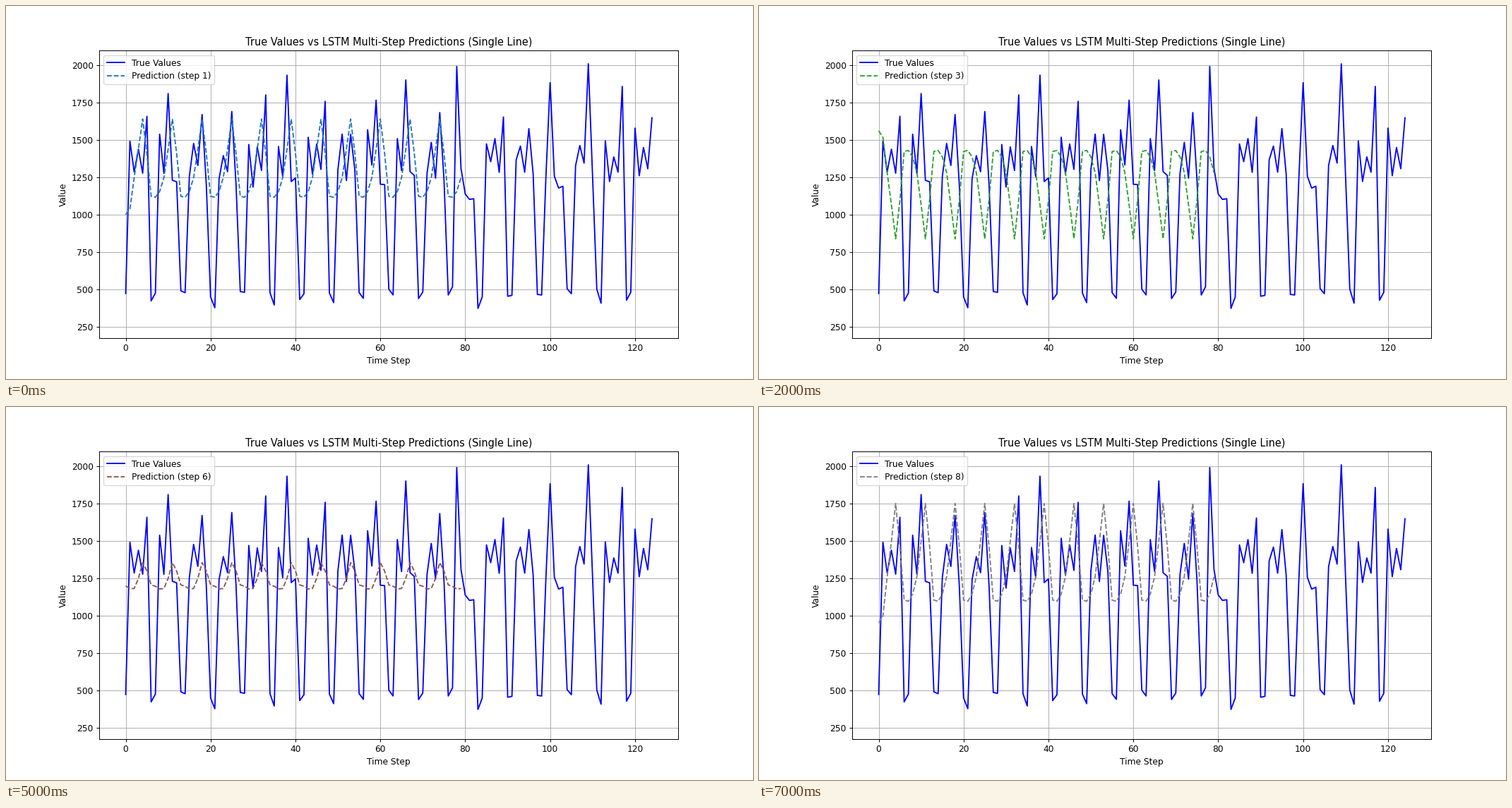
These frames come from a looping animation (1058x529 px, 8000 ms). A matplotlib script:

```python
import numpy as np
import matplotlib.pyplot as plt
from matplotlib.animation import FuncAnimation

DPI = 1058 / 12
DAYS, PREDICTED_DAYS, STEPS = 125, 80, 8
CENTRE = 1300

plt.rcParams["font.family"] = "DejaVu Sans"
rng = np.random.default_rng(7)

# Busiest weekday of each week and the value it reaches.
PEAKS = [(5, 1660), (3, 1812), (4, 1672), (4, 1692), (5, 1803), (3, 1935),
         (5, 1760), (4, 1540), (3, 1768), (3, 1903), (4, 1685), (1, 1993),
         (5, 1655), (4, 1578), (2, 1885), (4, 2011), (5, 1860), (5, 1650)]


def true_value(day):
    """Low weekends, a zigzag up to the weekly peak, then a decline."""
    week, weekday = divmod(day, 7)
    if weekday in (0, 6):
        return 475 + rng.normal(0, 50)
    peak_day, peak = PEAKS[week]
    lag = weekday - peak_day
    if lag == 0:
        return peak
    level = 1390 + 90 * (-1) ** lag if lag < 0 else 1320 - 60 * lag
    return level + rng.normal(0, 45)


true_values = [true_value(day) for day in range(DAYS)]

days = np.arange(PREDICTED_DAYS)
warm_up = days < 2
weekly_profile = np.array([1119, 1157, 1250, 1440, 1642, 1412, 1125])
weekly = weekly_profile[days % 7] - 116 * warm_up
wave = 1220 + 88 * np.cos(2 * np.pi * (days - 6.3) / 7) + 100 * warm_up


def scaled(level, gain):
    return level + gain * (weekly - CENTRE)


first, third = scaled(CENTRE, 1), scaled(1227, -1.13)
fourth, seventh, eighth = scaled(1232, -1.6), scaled(1255, 0.82), scaled(1325, 1.25)
predictions = [first, (first + third) / 2, third, fourth,
               wave, (wave + seventh) / 2, seventh, eighth]

fig, ax = plt.subplots(figsize=(12, 6), dpi=DPI)
ax.plot(true_values, color="blue", label="True Values")
prediction_line, = ax.plot(first, linestyle="--")
ax.set(xlim=(-6.2, 130.2), ylim=(177.7, 2098.3),
       xlabel="Time Step", ylabel="Value")
ax.set_title("True Values vs LSTM Multi-Step Predictions (Single Line)",
             fontsize=11.87)
ax.grid(True)


def update(step):
    prediction_line.set_ydata(predictions[step])
    prediction_line.set_color(f"C{step}")
    prediction_line.set_label(f"Prediction (step {step + 1})")
    ax.legend(loc="upper left", labelspacing=0.44)
    return prediction_line,


animation = FuncAnimation(fig, update, frames=STEPS, interval=1000, repeat=True)
plt.show()
```
